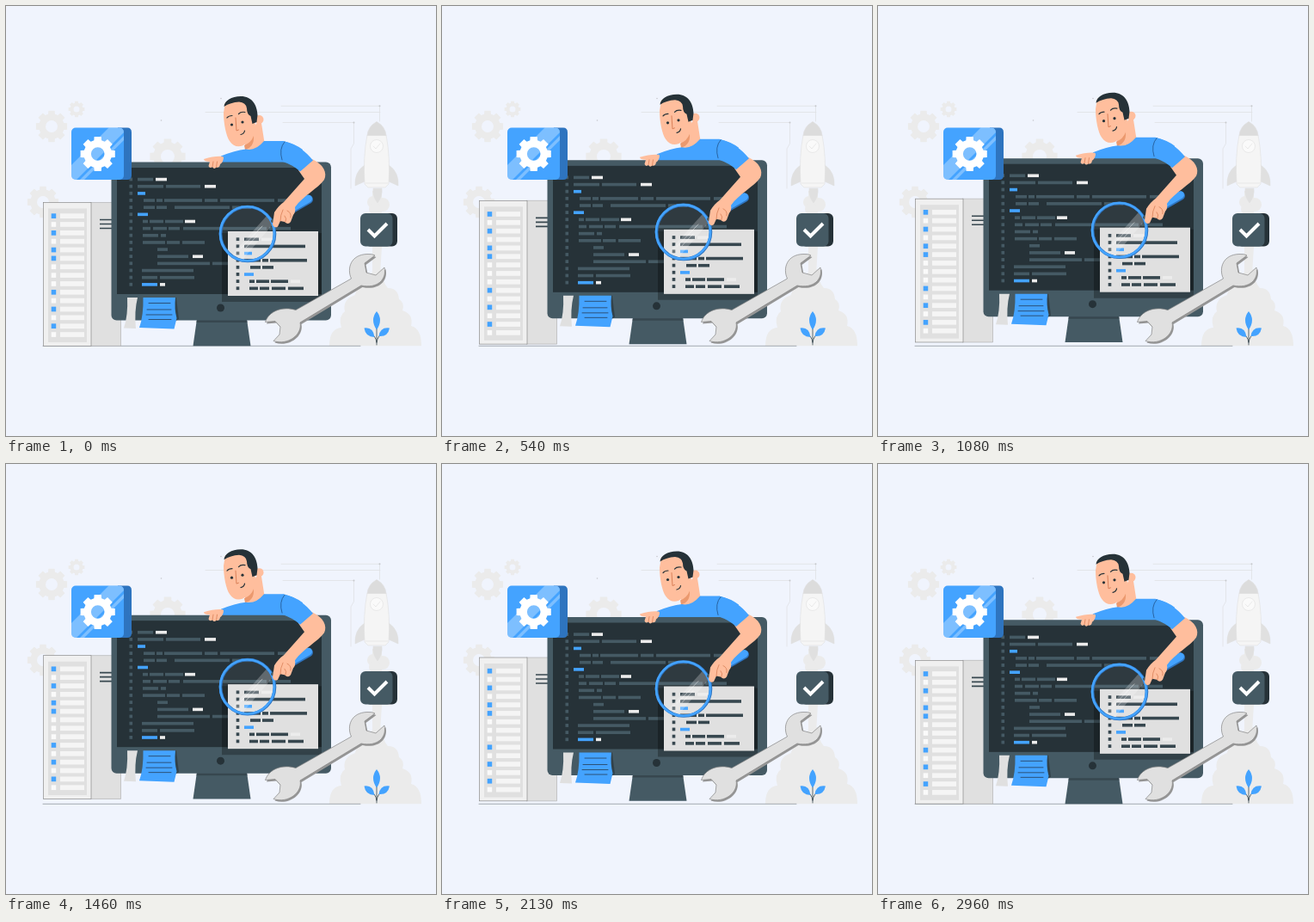
Write an HTML page that moves like this. It is 500 px wide and 500 px high and loops after 3000 ms.

```html
<!DOCTYPE html>
<html lang="en">
<head>
<meta charset="utf-8">
<title>Code review</title>
<style>
html, body { margin: 0; height: 100%; overflow: hidden; background: #f0f4fd; }
svg { display: block; width: 100vw; height: 100vh; }
.line { fill: none; stroke-linecap: round; stroke-linejoin: round; }
</style>
</head>
<body>
<svg viewBox="0 0 500 500">
  <defs>
    <clipPath id="iconClip"><rect x="76" y="141.500" width="61" height="60.500" rx="5"/></clipPath>
    <clipPath id="lensClip"><circle cx="281" cy="265" r="31"/></clipPath>
    <path id="wrench" d="M401.500 317C396 305 401 289 420 288.500Q426 288 429 290L417 299 419 310 430 313 440 304C443 318 432 329 413 325L342 368C345 382 328 395 311 389.500L318 382 319 373 313 366.500 301.500 367.500C306 354 322 349 337 353.500Z"/>
  </defs>

  <!-- backdrop -->
  <g id="gears" fill="#ebebeb"></g>
  <g class="line" stroke="#e0e1e5" stroke-width=".8">
    <path d="M232 123.500H435M320 116.300H434.500V134M322 135.500H404.500V160L401 166V212"/>
  </g>
  <g fill="#c6c8cc">
    <circle cx="434.500" cy="116.300" r="1"/><circle cx="404.500" cy="135.500" r="1"/>
    <circle cx="250" cy="107.500" r=".8"/><circle cx="180.500" cy="133" r=".8"/>
  </g>
  <g fill="#ebebeb">
    <path d="M426 215H437V280L435 312H426ZM376 395.300Q376 375 390 374Q386 361 394 355Q391 341 406 336Q408 324 421 322Q423 312 427 308L437 306Q438 322 444 328Q456 328 457 341Q464 345 461 354Q474 358 471 372Q483 375 483 395.300Z"/>
    <circle cx="427" cy="228" r="7"/><circle cx="438" cy="231" r="8"/><circle cx="429" cy="236" r="7"/>
  </g>
  <g stroke="#e0e0e0" stroke-width=".6">
    <path fill="#e0e0e0" d="M417 185Q405 193 406 209L417 204ZM445 185Q457 193 456 209L445 204ZM427 212H437Q438 221 432 229Q426 221 427 212Z"/>
    <path fill="#f5f5f5" d="M420 150H442Q447 176 445 207L441 211H421L417 207Q415 176 420 150Z"/>
    <path fill="#dcdcdc" d="M431 134.500Q421 140 420 150.500H442Q441 140 431 134.500Z"/>
    <circle cx="431" cy="163" r="7.500" fill="#fafafa"/>
    <path class="line" d="M418 206H444M427 163L430 166 435 160"/>
  </g>
  <path class="line" d="M43 395.300H412" stroke="#858b91" stroke-width=".7"/>

  <!-- floating part -->
  <g id="float">
    <path d="M98 228.500H133.500V395.300H98Z" fill="#e0e0e0" stroke="#aaa" stroke-width=".6"/>
    <rect x="43.400" y="228.500" width="55.600" height="166.800" fill="#f0f0f0" stroke="#8b8b8b" stroke-width=".7"/>
    <rect x="49" y="235.500" width="45" height="155.500" fill="#e0e0e0"/>
    <g id="slots"></g>
    <path d="M109 248.500H124M109 253.500H124M109 258.500H124" stroke="#37474f" stroke-width="1.600"/>

    <!-- head and torso -->
    <path fill="#ffbe9d" d="M278 155V168Q286 176 301 162L296 130Z"/>
    <path fill="#eb996e" d="M277 162Q285 159 288 151Q289 164 278 167Z"/>
    <path fill="#44a3ff" d="M246 184L250 174.500Q266 168 279 166.500Q290 169 300 157L322 157Q336 160 345 167L340 188Z"/>
    <circle cx="294.500" cy="132" r="5" fill="#ffbe9d"/>
    <path fill="#ffbe9d" d="M255 112L253 124C253 137 256 151 260 157C265 165 274 165 280 159Q288 151 290 138L284 112Q268 106 255 112Z"/>
    <path fill="#263238" d="M253.500 117C254 110 262 105 273 105C286 105 292 115 292.500 127L291.500 135 286.500 137 284.500 128Q280 126 280 119Q279 112 271 111.500Q261 112 253.500 117Z"/>
    <g class="line" stroke="#263238" stroke-width="1.200">
      <path d="M257 130Q259 127.500 263 127.500M270.500 125.500Q273 122.500 278 123.500M273 149.500Q277 148.500 277.500 145"/>
      <path d="M267 130L268 145 270.500 144" stroke="#d98058" stroke-width="1"/>
    </g>
    <g fill="#263238"><circle cx="262.500" cy="138" r="1.600"/><circle cx="275" cy="135" r="1.600"/></g>

    <!-- monitor -->
    <path fill="#455a64" d="M222 364H280L284.500 395.300H217.500Z"/>
    <path fill="#37474f" d="M222 365H280L280.500 368H221.500Z"/>
    <rect x="122.500" y="181.500" width="255.500" height="184" rx="6" fill="#455a64"/>
    <rect x="129" y="188" width="238" height="147" fill="#263238"/>
    <circle cx="249.500" cy="351" r="4.500" fill="#263238"/>
    <g id="code"></g>
    <path d="M251 264H367V344H251Z" fill="#000" opacity=".28"/>
    <rect x="258" y="262" width="105" height="75" fill="#e0e0e0"/>
    <g id="panel"></g>

    <!-- paper notes -->
    <path fill="#e0e0e0" d="M141 339H153Q149 355 151 375L137 374.500Q142 360 141 339Z"/>
    <path fill="#263238" opacity=".6" d="M195 339H198L201 364 196 367Z"/>
    <path fill="#44a3ff" d="M159.500 339H197Q195.500 352 198.500 363L195.500 375.500 155 374Q160 360 159.500 339Z"/>
    <path class="line" d="M166 345.500H191M164 353H192M163 359H193M166 364.500H192" stroke="#263d55" stroke-width=".8"/>

    <!-- magnifier -->
    <g clip-path="url(#lensClip)">
      <circle cx="281" cy="265" r="31" fill="#fff" opacity=".04"/>
      <path d="M262 290L304 243 312 252 274 296Z" fill="#fff" opacity=".24"/>
      <path d="M273 282L298 256M279 281L292 267" class="line" stroke="#fff" stroke-width="1" opacity=".45"/>
    </g>
    <circle cx="281" cy="265" r="31.500" fill="none" stroke="#2e74bf" stroke-width="3.600"/>
    <circle cx="280.500" cy="264.800" r="31.500" fill="none" stroke="#44a3ff" stroke-width="2.600"/>
    <path class="line" d="M310 250L325 241" stroke="#455a64" stroke-width="4"/>
    <path class="line" d="M326 240L352 225" stroke="#2e74bf" stroke-width="10"/>
    <path class="line" d="M326 238.500L351.500 224" stroke="#44a3ff" stroke-width="9"/>

    <!-- arm and hands -->
    <path fill="#ffbe9d" d="M340 191L356 178C369 184 374 194 370 202C363 212 345 221 336 234Q337 240 334 243L331 251Q328 255 324 251L319 250 316 256.500Q312 259 310 254L312 240Q317 232 323 228L347 201Z"/>
    <path class="line" d="M322 237Q319 243 319 250M327 238Q332 240 331 246M324 244Q327 247 325 251" stroke="#d98058" stroke-width=".8"/>
    <path fill="#44a3ff" d="M322 157C336 160 349 169 357 179.500L342 192.500Q334 185 322 181Q317 168 322 157Z"/>
    <path class="line" d="M324 158Q317 166 321 179" stroke="#225489" stroke-width=".8"/>
    <path fill="#ffbe9d" d="M252 175Q243 174 230 178Q230 181 237 181L235.500 186Q237 189.500 240 187Q242 190.500 244.500 187.500Q248 189 249 184Q253 181 253 176Z"/>
    <path class="line" d="M241 181L240 187M245.500 181L244.500 187.500" stroke="#d98058" stroke-width=".8"/>
  </g>

  <!-- fixed foreground -->
  <path fill="#2e74bf" d="M130 141.500H141Q146 141.500 146 147V197Q146 202 141 202H130Z"/>
  <g clip-path="url(#iconClip)">
    <path fill="#44a3ff" d="M76 141H138V203H76Z"/>
    <path fill="#fff" opacity=".3" d="M120 141H137V147L82 202H76V185ZM137 151V156L91 202H86Z"/>
  </g>
  <g id="cog" fill="#fff"></g>

  <rect x="417" y="241" width="38" height="38.500" rx="6" fill="#263238"/>
  <rect x="412" y="241" width="37.500" height="38.500" rx="6" fill="#455a64"/>
  <path d="M421 260L428.500 267.500 443 253" fill="none" stroke="#fff" stroke-width="4"/>

  <use href="#wrench" transform="translate(1.500 2)" fill="#969696"/>
  <use href="#wrench" fill="#e0e0e0" stroke="#858585" stroke-width=".7"/>

  <path class="line" d="M431 365V394M422 379Q430 383 431 391M440 379Q432 383 431 391" stroke="#37474f" stroke-width=".8"/>
  <path fill="#44a3ff" d="M431 355Q439 365 431 376.500Q423 365 431 355ZM416.500 374.500Q427 373 428.500 385Q418 385 416.500 374.500ZM446 374.500Q435 373 433.500 384Q444 385 446 374.500Z"/>
</svg>
<script>
const el = id => document.getElementById(id);
const GREY = '#455a64', DARK = '#37474f', WHITE = '#ececec', BLUE = '#44a3ff';
const LOOP = 3000, RISE = 6;

const rect = (x, y, w, h, fill) =>
  `<rect x="${x}" y="${y}" width="${w}" height="${h}" fill="${fill}"/>`;

function gear(cx, cy, r, hole) {
  let d = '';
  for (let i = 0; i < 8; i++) {
    for (const [a, k] of [[-.27, .8], [-.2, 1], [.2, 1], [.27, .8]]) {
      const t = i * Math.PI / 4 + a;
      d += `${d ? 'L' : 'M'}${cx + r * k * Math.cos(t)} ${cy + r * k * Math.sin(t)}`;
    }
  }
  d += `ZM${cx - hole} ${cy}a${hole} ${hole} 0 1 0 ${2 * hole} 0a${hole} ${hole} 0 1 0 ${-2 * hole} 0Z`;
  return `<path fill-rule="evenodd" d="${d}"/>`;
}

// Each row lists "from-to" spans; a leading w or b selects white or blue.
function codeRows(rows, top, gutter, base) {
  return rows.map((row, i) => {
    const y = top + i * 8.15;
    return rect(gutter, y - 2, 3.6, 3.8, base) + row.split(' ').map(span => {
      const [from, to] = span.match(/\d+/g).map(Number);
      const fill = { w: WHITE, b: BLUE }[span[0]] || base;
      return rect(from, y - 1.8, to - from, 3.6, fill);
    }).join('');
  }).join('');
}

el('gears').innerHTML = gear(53, 140, 18.5, 7) + gear(82, 120, 9.5, 3.5) +
  gear(188, 175, 21, 8) + gear(43, 228, 18.5, 7);
el('cog').innerHTML = gear(106.7, 172, 20.5, 7.8);

el('slots').innerHTML = [...'101011000101010'].map((on, i) => {
  const y = 241.3 + i * 9.85;
  return rect(52.7, y, 5.5, 5.7, on === '1' ? BLUE : '#fafafa') + rect(63, y, 28, 5.7, '#f5f5f5');
}).join('');

el('code').innerHTML = codeRows([
  '153-171 w174-187',
  '153-183 186-226 w231-244',
  'b153-162',
  '160-173 175-182 184-228 231-246 249-312 316-327',
  '160-173 175-187 196-260 263-285',
  'b153-165',
  '159-165 167-183 185-206 w208-220',
  '159-168 171-187 189-202 206-303 306-331',
  '159-177 180-186',
  '159-185 187-202 205-231',
  '176-188',
  '176-212 w217-229',
  '176-237 240-258',
  '158-218',
  '158-176 179-219',
  'b158-176 w179-185'
], 201.6, 143.5, GREY);

el('panel').innerHTML = codeRows([
  '277-294 w297-309',
  '277-348',
  'b277-286',
  '277-296 298-305 307-350',
  '284-296 298-311',
  'b277-288',
  '283-289 291-306 308-328 w331-342',
  '283-293 295-306 309-325 328-346'
], 271.3, 267.7, DARK);

// Steady rise in the first half of the loop, steady fall in the second.
function draw(now) {
  const phase = now % LOOP / LOOP;
  const lift = RISE * (1 - Math.abs(1 - 2 * phase));
  el('float').setAttribute('transform', `translate(0 ${-lift})`);
  requestAnimationFrame(draw);
}
draw(performance.now());
</script>
</body>
</html>
```
